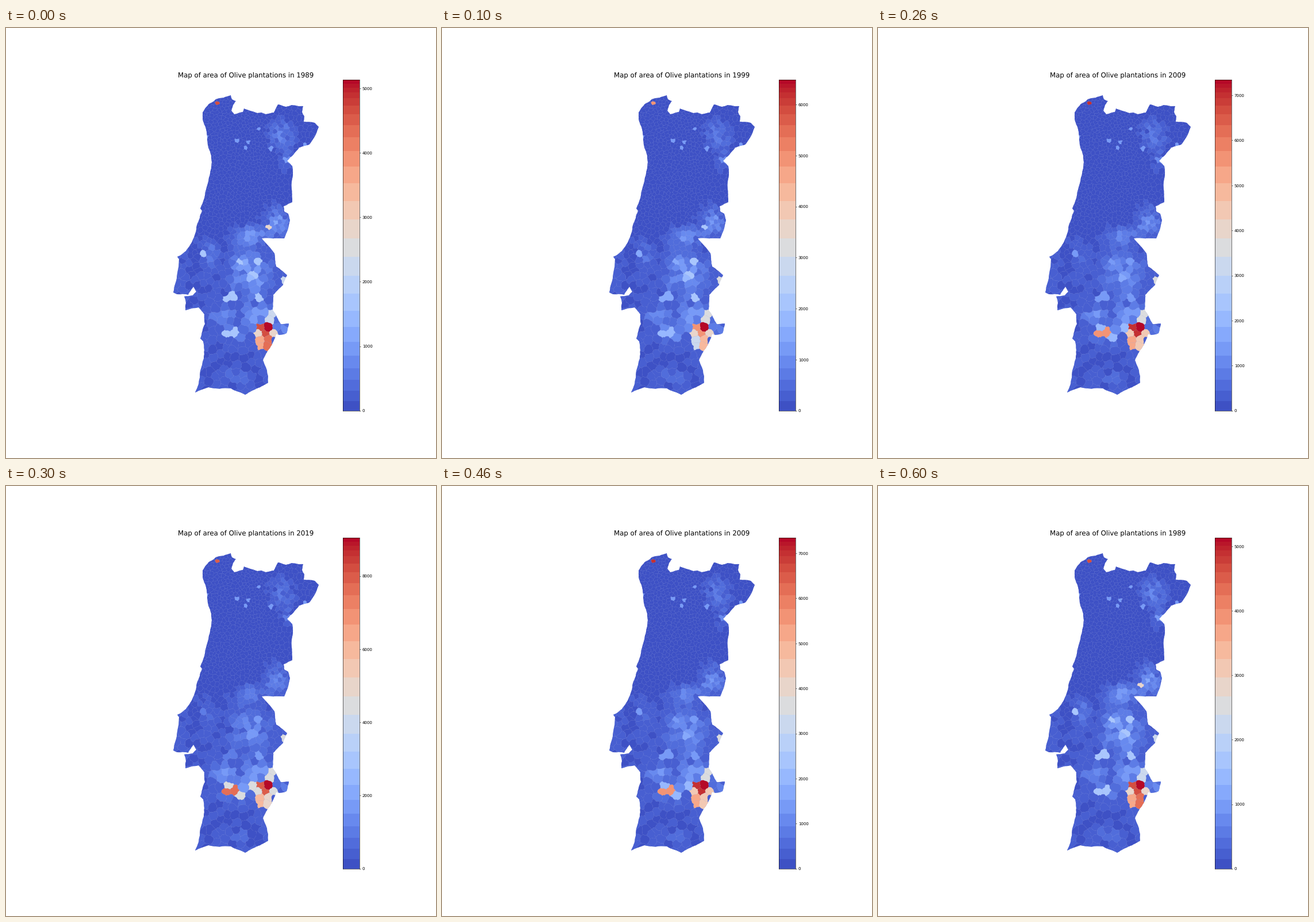
A matplotlib script for the animation above (700 ms loop, 748x748 px).

```python
import math

import matplotlib.pyplot as plt
import numpy as np
from matplotlib.animation import FuncAnimation
from matplotlib.collections import PolyCollection
from matplotlib.patches import PathPatch
from matplotlib.path import Path
from matplotlib.tri import Triangulation

SIZE, DPI = 748, 50
YEARS = [1989, 1999, 2009, 2019]
PEAKS = [5136, 6487, 7347, 9049]
ORDER = [0, 1, 2, 3, 2, 1, 0]
BANDS = 26

plt.rcParams.update({"font.family": "DejaVu Sans", "text.hinting": "none"})
rng = np.random.default_rng(11)

# Key points of the outline in stage pixels, counter-clockwise
COAST = [(352, 133), (342, 147), (342, 158), (348, 176), (350, 195), (357, 222),
         (358, 233), (349, 277), (338, 314), (341, 318), (332, 343), (324, 371),
         (313, 388), (298, 398), (301, 402), (298, 427), (291, 460), (297, 463),
         (317, 464), (326, 450), (331, 459), (325, 465), (310, 467), (313, 478),
         (312, 491), (335, 486), (345, 498), (346, 515), (338, 540), (343, 545),
         (344, 575), (335, 619), (329, 634), (352, 625), (391, 627), (408, 634),
         (416, 638), (430, 630), (442, 625)]
BORDER = [(456, 617), (454, 595), (447, 578), (459, 557), (470, 532), (476, 534),
          (488, 531), (492, 514), (478, 515), (464, 491), (465, 464), (482, 447),
          (489, 430), (470, 415), (467, 392), (445, 366), (484, 366), (494, 334),
          (491, 323), (484, 319), (483, 310), (498, 303), (497, 281), (499, 252),
          (498, 240), (489, 231), (510, 208), (527, 203), (541, 180), (544, 172),
          (537, 165), (518, 163), (519, 154), (515, 146), (517, 136), (497, 134),
          (487, 137), (473, 133), (466, 147), (452, 150), (444, 147), (437, 148),
          (428, 145), (414, 140), (412, 146), (397, 150), (392, 144), (395, 134),
          (400, 127), (393, 124), (391, 117), (365, 124)]

# Leading parishes: share of the peak in each year, then where they lie
LEADERS = [((1, 1, 1, 1), [(456, 521)]),
           ((.90, .78, .95, .87), [(442, 521), (451, 531), (368, 130)]),
           ((.84, .65, .60, .54), [(457, 541), (454, 553)]),
           ((.73, .46, .71, .66), [(442, 541), (443, 552)]),
           ((.56, .54, .58, .50), [(439, 531), (466, 531)]),
           ((.46, .48, .50, .48), [(460, 508), (463, 497), (485, 438)]),
           ((.56, .35, .14, .11), [(456, 346)]),
           ((.34, .27, .74, .83), [(384, 532), (397, 529)]),
           ((.12, .15, .30, .50), [(429, 521), (387, 521), (407, 539)]),
           ((.34, .35, .20, .18), [(439, 469), (438, 404), (431, 428)]),
           ((.33, .22, .18, .12), [(394, 466), (384, 469), (407, 407), (343, 391)])]

# Broad hills: x, y, spread in x and y, first and last share
HILLS = [(480, 185, 22, 25, .10, .07), (490, 230, 10, 14, .18, .10),
         (472, 338, 20, 26, .14, .10), (425, 362, 25, 14, .17, .09),
         (355, 392, 10, 14, .17, .05), (425, 425, 30, 32, .20, .12),
         (372, 497, 18, 13, .10, .15), (440, 495, 25, 22, .16, .16),
         (402, 525, 22, 20, .05, .15), (480, 522, 12, 12, .16, .10),
         (405, 608, 25, 10, .06, .05)]


def shade(share):
    """Diverging colour in steps that are widest around the middle."""
    u = np.linspace(0, 1, BANDS + 1)
    edges = u + .079 * np.sin(np.pi * u) - .075 * np.sin(2 * np.pi * u)
    middles = (edges[1:] + edges[:-1]) / 2
    return plt.cm.coolwarm(middles[np.searchsorted(edges[1:-1], share)])


def ragged(p, q, wobble, depth):
    """Uneven line from p towards q, identical when walked backwards."""
    if depth == 0:
        return [p]
    sx, sy = p[0] + q[0], p[1] + q[1]
    lo, hi = min(p, q), max(p, q)
    bend = (math.sin(12.9898 * sx + 78.233 * sy) * 43758.5453 % 1 - .5) * wobble
    mid = (sx / 2 - bend * (hi[1] - lo[1]), sy / 2 + bend * (hi[0] - lo[0]))
    return ragged(p, mid, wobble, depth - 1) + ragged(mid, q, wobble, depth - 1)


def ring(points, wobble=.4, depth=2):
    return [v for p, q in zip(points, points[1:] + points[:1])
            for v in ragged(p, q, wobble, depth)]


def spacing(x, y):
    """Parishes grow towards the south and the north-east."""
    gap = np.interp(y, [100, 310, 480], [4.2, 4.8, 10.5])
    return gap + 2 * np.clip((x - 440) / 50, 0, 1) * (y < 310)


def scatter_sites(fixed, tries=24000):
    sites = np.empty((len(fixed) + tries, 2))
    n = len(fixed)
    sites[:n] = fixed
    for x, y in rng.uniform((275, 100), (560, 655), (tries, 2)):
        near = ((sites[:n] - (x, y)) ** 2).sum(axis=1).min()
        if near > spacing(x, y) ** 2:
            sites[n] = x, y
            n += 1
    return sites[:n]


def voronoi(sites):
    """Corner lists of the cell around each site."""
    tri = Triangulation(*sites.T).triangles
    a = sites[tri[:, 0]]
    b, c = sites[tri[:, 1]] - a, sites[tri[:, 2]] - a
    d = 2 * (b[:, 0] * c[:, 1] - b[:, 1] * c[:, 0])
    bb, cc = (b ** 2).sum(axis=1), (c ** 2).sum(axis=1)
    ux = (c[:, 1] * bb - b[:, 1] * cc) / d
    uy = (b[:, 0] * cc - c[:, 0] * bb) / d
    centers = a + np.column_stack([ux, uy])
    around = [[] for _ in sites]
    for t, corners in enumerate(tri):
        for v in corners:
            around[v].append(t)
    cells = []
    for site, ids in zip(sites, around):
        pts = centers[ids]
        turn = np.argsort(np.arctan2(*(pts - site).T[::-1]))
        cells.append([(float(x), float(y)) for x, y in pts[turn]])
    return cells


def field(sites):
    """Share of the peak per site and year."""
    x, y = sites.T
    n = len(sites)
    base = np.interp(y, [320, 440], [.012, .03]) * rng.uniform(.5, 1.7, n)
    hills = np.zeros((n, 4))
    for hx, hy, sx, sy, first, last in HILLS:
        bump = np.exp(-((x - hx) / sx) ** 2 - ((y - hy) / sy) ** 2)
        hills += bump[:, None] * np.linspace(first, last, 4)
    total = base[:, None] + hills * rng.uniform(.3, 1.5, (n, 1))
    total[(y < 300) & (rng.random(n) < .01)] = .2  # lone groves in the north
    return total


outline = Path(ring(COAST + BORDER, wobble=.1, depth=3))
known = [(*spot, *share) for share, spots in LEADERS for spot in spots]
sites = scatter_sites([k[:2] for k in known])
shares = field(sites)
shares[:len(known)] = [k[2:] for k in known]
cells = voronoi(sites)
inner = [i for i, c in enumerate(cells) if np.ptp(c, axis=0).max() < 60]
values = shares[inner].clip(0, 1)

fig = plt.figure(figsize=(SIZE / DPI, SIZE / DPI), dpi=DPI, facecolor="white")
ax = fig.add_axes([0, 0, 1, 1])
ax.set(xlim=(0, SIZE), ylim=(SIZE, 0))
ax.axis("off")
ground = ax.add_patch(PathPatch(outline, facecolor="#9da9e2", linewidth=0))
land = PolyCollection([ring(cells[i]) for i in inner], edgecolors="none", linewidths=0)
ax.add_collection(land, autolim=False)
land.set_clip_path(ground)
title = ax.text(417.3, 85.6, "", fontsize=17, ha="center", va="baseline")

cax = fig.add_axes([.78375, .11, .0385, .77])
bar = cax.imshow(shade(np.linspace(0, 1, 1152))[:, None], origin="lower",
                 aspect="auto", interpolation="nearest", extent=(0, 1, 0, 1))
cax.set_xticks([])
cax.yaxis.tick_right()


def update(i):
    k = ORDER[i]
    peak = PEAKS[k]
    land.set_facecolor(shade(values[:, k]))
    title.set_text(f"Map of area of Olive plantations in {YEARS[k]}")
    bar.set_extent((0, 1, 0, peak))
    cax.set_ylim(0, peak)
    cax.set_yticks(np.arange(0, peak, 2000 if peak > 8000 else 1000))
    return land, title, bar


anim = FuncAnimation(fig, update, frames=len(ORDER), interval=100,
                     repeat=True, repeat_delay=0, blit=False)
plt.show()
```
